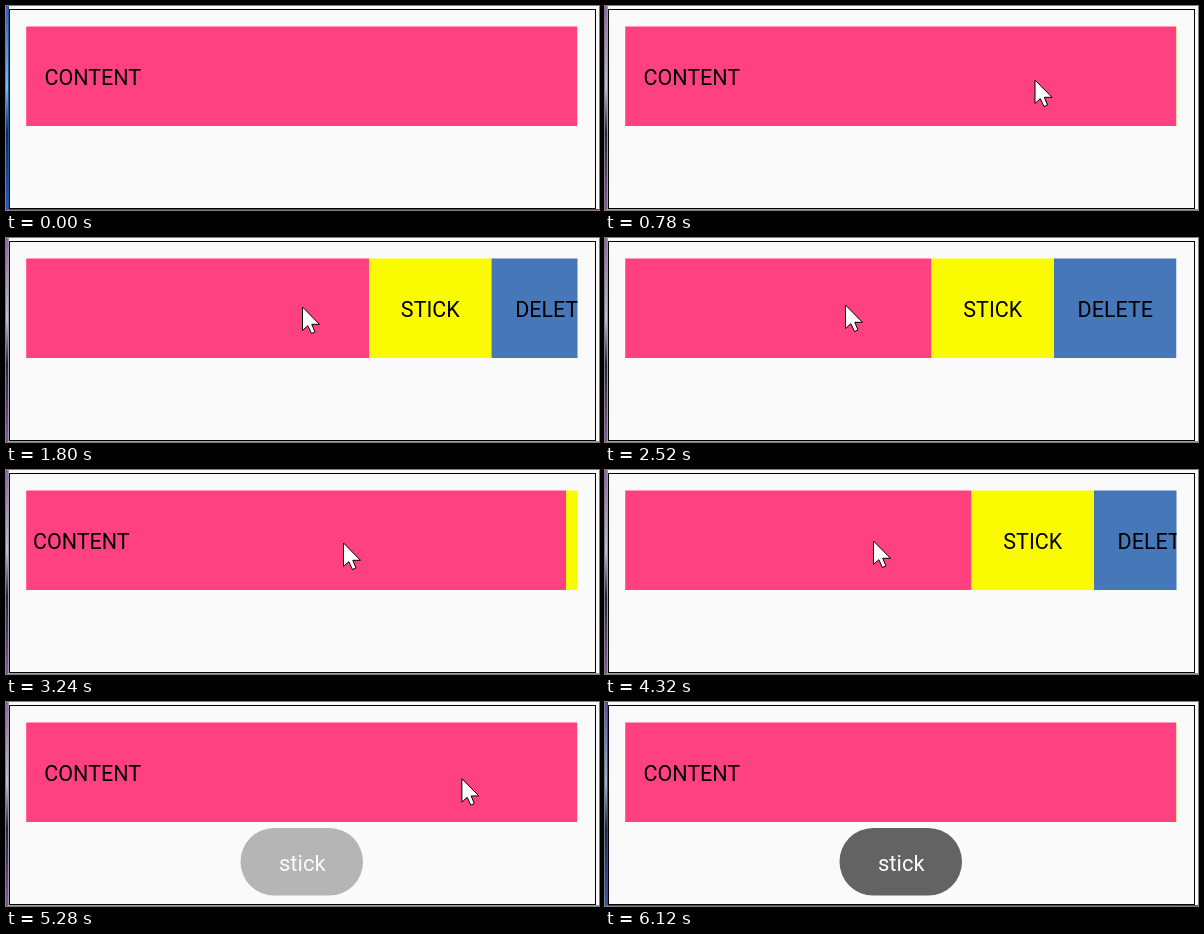
Write an HTML page that moves like this. It is 593 px wide and 204 px high and loops after 6.24 s.

```html
<!DOCTYPE html>
<html lang="en">
<head>
<meta charset="utf-8">
<title>Swipe row</title>
<style>
  html, body { margin: 0; width: 100%; height: 100%; overflow: hidden; background: #fafafa; }
  svg { display: block; }
  text { font: 21.5px Roboto, sans-serif; }
  .mid { text-anchor: middle; }
</style>
</head>
<body>
<svg width="593" height="204" viewBox="0 0 593 204">
  <defs>
    <linearGradient id="cool" x2="0" y2="1">
      <stop offset="0" stop-color="#5a4fa8"/>
      <stop offset=".4" stop-color="#8fb8e0"/>
      <stop offset=".62" stop-color="#1c2350"/>
      <stop offset="1" stop-color="#3a55b8"/>
    </linearGradient>
    <linearGradient id="warm" x2="0" y2="1">
      <stop offset="0" stop-color="#8a63b0"/>
      <stop offset=".4" stop-color="#c9bcd8"/>
      <stop offset=".62" stop-color="#2b1f3e"/>
      <stop offset="1" stop-color="#8157a8"/>
    </linearGradient>
    <clipPath id="row"><rect x="20.2" y="20.5" width="551.3" height="99.5"/></clipPath>
  </defs>
  <rect width="593" height="204" fill="#fafafa"/>
  <rect id="strip" width="2" height="204"/>
  <path id="edge" d="M2.5 0V203.5H593" fill="none"/>
  <rect x="3.5" y="3.5" width="586" height="199" fill="none" stroke="#000"/>
  <g clip-path="url(#row)">
    <g id="slide">
      <rect x="20" y="20" width="551.5" height="100" fill="#ff4081"/>
      <text x="38.4" y="79">CONTENT</text>
      <rect x="571.5" y="20" width="122.5" height="100" fill="#fafa00"/>
      <text class="mid" x="632.8" y="79">STICK</text>
      <rect x="694" y="20" width="122.5" height="100" fill="#4677b8"/>
      <text class="mid" x="755.3" y="79">DELETE</text>
    </g>
  </g>
  <g id="toast">
    <rect x="234.5" y="126" width="122.5" height="67.5" rx="33.7" fill="#636363"/>
    <text class="mid" x="296.3" y="168.5" fill="#fafafa" style="font-size:22px">stick</text>
  </g>
  <path id="cursor" d="M.5 0V23.5L5.8 18.7 9.5 26.5 13 25 9.8 17.3H17.5Z" fill="#fff" stroke="#000"/>
</svg>
<script>
const LOOP = 6240, STEP = 60, OPEN = 245, SETTLE = 300;
const $ = id => document.getElementById(id);
const progress = (t, from, to) => Math.min(1, Math.max(0, (t - from) / (to - from)));
const easeOut = (p, power) => 1 - (1 - p) ** power;

// where the pointer goes; dragging moves carry the row along
const moves = [
  { from: 120, to: 780, x: 429.5, y: 74 },
  { from: 780, to: 1740, x: 296, y: 69, drag: true },
  { from: 2040, to: 2340, x: 233, y: 66 },
  { from: 2460, to: 2520, x: 240, y: 67 },
  { from: 2520, to: 3120, x: 337, y: 73, drag: true },
  { from: 3240, to: 3720, x: 473, y: 74 },
  { from: 4080, to: 4320, x: 268, y: 71, drag: true },
  { from: 4320, to: 4680, x: 374, y: 68 },
  { from: 5038, to: 5039, x: 374, y: 68, drag: true },
  { from: 5100, to: 5600, x: 600, y: 92 }
];
const drags = moves.filter(m => m.drag);

function pointer(t) {
  let x = 600, y = 39;
  for (const m of moves) {
    const p = easeOut(progress(t, m.from, m.to), m.drag ? 1.67 : 1);
    x += (m.x - x) * p;
    y += (m.y - y) * p;
  }
  return { x, y };
}

// drags alternately open and close the row, which settles on release
function offset(t) {
  const i = drags.findLastIndex(d => d.from <= t);
  if (i < 0) return 0;
  const { from, to } = drags[i];
  const base = i % 2 ? OPEN : 0;
  const pulled = base + pointer(from).x - pointer(Math.min(t, to)).x;
  return pulled + (OPEN - base - pulled) * easeOut(progress(t, to, to + SETTLE), 5);
}

function draw(now) {
  const t = Math.floor((now % LOOP) / STEP) * STEP;
  const { x, y } = pointer(t);
  const away = t >= 780 && t < 6120;
  $("slide").setAttribute("transform", `translate(${-offset(t)} 0)`);
  $("cursor").setAttribute("transform", `translate(${x} ${y})`);
  $("toast").setAttribute("opacity", progress(t, 5100, 5500));
  $("strip").setAttribute("fill", away ? "url(#warm)" : "url(#cool)");
  $("edge").setAttribute("stroke", away ? "#999" : "#0a5fa8");
}

const start = performance.now();
function tick() {
  draw(performance.now() - start);
  requestAnimationFrame(tick);
}
tick();
</script>
</body>
</html>
```
